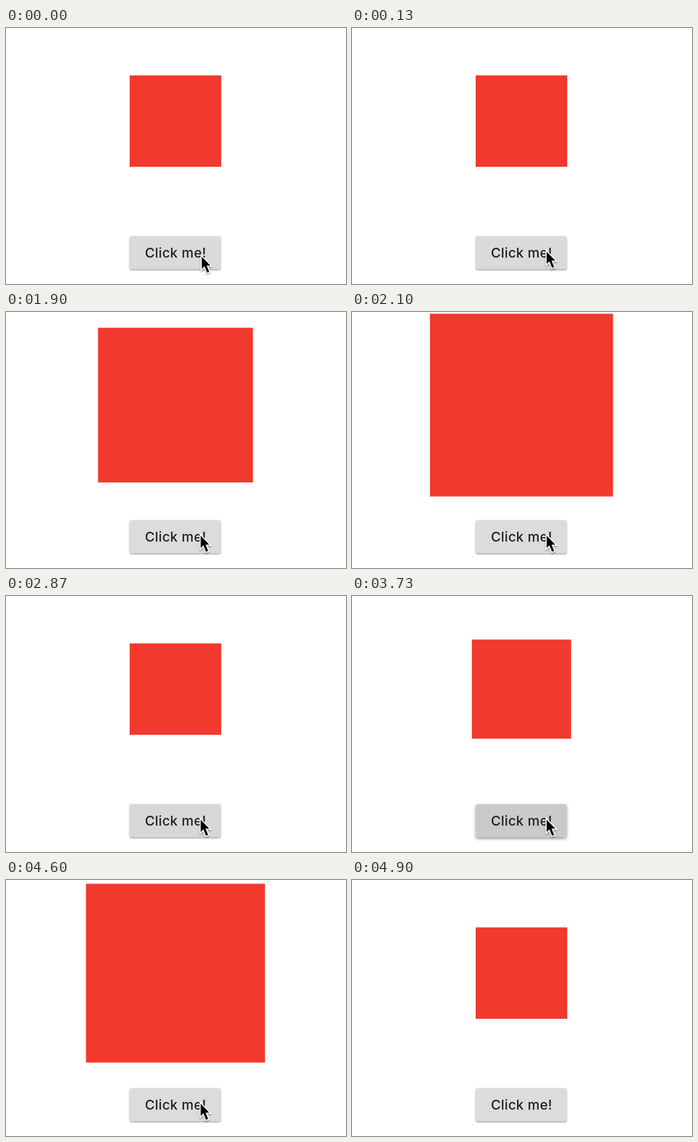
An HTML page that plays this animation: 618x466 px, repeating every 5610 ms.

```html
<!DOCTYPE html>
<html lang="en">
<head>
<meta charset="utf-8">
<title>Click me</title>
<style>
  html, body {
    margin: 0;
    width: 100%;
    height: 100%;
    overflow: hidden;
    background: #fff;
  }
  .stage {
    position: relative;
    width: 618px;
    height: 466px;
    overflow: hidden;
  }
  .scene, .button, .cursor { position: absolute; }
  .box, .button, .cursor { animation: 5610ms linear infinite; }
  .scene {
    left: 0;
    top: 0;
  }
  .box {
    fill: #f1392d;
    transform-origin: 308px 169.5px;
    animation-name: grow;
  }
  .button {
    left: 225px;
    top: 379px;
    width: 165px;
    height: 60px;
    border-radius: 3px;
    font: 500 24.5px/60px Inter, Roboto, sans-serif;
    letter-spacing: .35px;
    text-indent: 1.5px;
    text-align: center;
    white-space: nowrap;
    color: #212121;
    --rest: 0 2px 3px rgba(0, 0, 0, .28), 0 1px 5px rgba(0, 0, 0, .12);
    --lift: 0 3px 5px rgba(0, 0, 0, .3), 0 2px 9px rgba(0, 0, 0, .14);
    animation-name: press;
  }
  .cursor {
    left: 353px;
    top: 405px;
    width: 22px;
    height: 38px;
    overflow: visible;
    filter: drop-shadow(0 2px 1.5px rgba(0, 0, 0, .35));
    animation-name: point;
  }

  @keyframes grow {
    0%, 27.81% { transform: scale(1); }
    33.87% { transform: scale(1.69); }
    35.65% { transform: scale(1.9); }
    37%, 46.1% { transform: scale(2); }
    50.45%, 65.78% { transform: scale(1); }
    66.49% { transform: scale(1.082); }
    71.3% { transform: scale(1.638); }
    72.55% { transform: scale(1.805); }
    73.62%, 81.82% { transform: scale(2); }
    86.19%, 100% { transform: scale(1); }
  }
  @keyframes press {
    0%, 26.15% { background: #dadada; box-shadow: var(--rest); }
    26.2% { background: #d4d4d4; box-shadow: var(--rest); }
    27.8%, 29.2% { background: #cacaca; box-shadow: var(--lift); }
    31.4%, 49.9% { background: #dcdcdc; box-shadow: var(--rest); }
    51%, 62.9% { background: #d7d7d7; box-shadow: var(--rest); }
    64%, 66.7% { background: #cacaca; box-shadow: var(--lift); }
    68.6%, 100% { background: #dcdcdc; box-shadow: var(--rest); }
  }
  @keyframes point {
    0%, .53% { transform: translate(2px, 9px); }
    2.3%, 85.2% { transform: none; visibility: visible; }
    87.3% { transform: translate(-220px, -275px); visibility: visible; }
    87.31%, 100% { transform: translate(-220px, -275px); visibility: hidden; }
  }
</style>
</head>
<body>
<div class="stage">
  <svg class="scene" width="618" height="466">
    <rect class="box" x="224.8" y="86.3" width="166.4" height="166.4"/>
  </svg>
  <div class="button">Click me!</div>
  <svg class="cursor" viewBox="0 0 22 38">
    <path d="M.8 2.2V24.6L5.9 19.8 10.6 31.4 14.4 29.8 9.7 18.5H16.6Z"
      fill="#000" stroke="#fff" stroke-width="4" stroke-linejoin="miter" paint-order="stroke"/>
  </svg>
</div>
</body>
</html>
```
